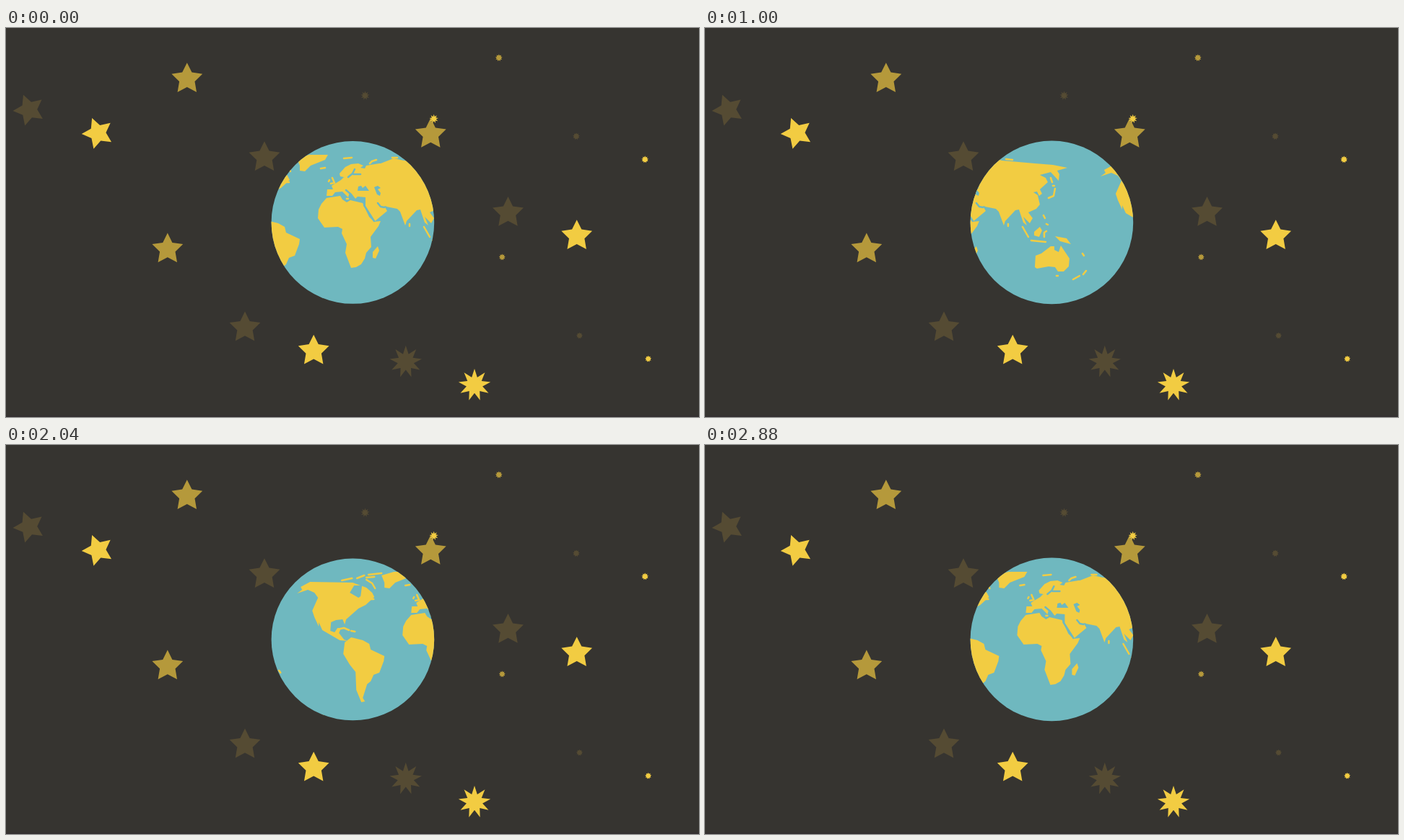
An HTML page with a canvas that plays this animation: 960x540 px, repeating every 2920 ms.

```html
<!DOCTYPE html>
<html lang="en">
<head>
<meta charset="utf-8">
<title>Spinning globe</title>
<style>
html, body { margin: 0; width: 100%; height: 100%; overflow: hidden; background: #363430; }
canvas { display: block; }
</style>
</head>
<body>
<canvas id="stage" width="960" height="540"></canvas>
<script>
const ctx = document.getElementById('stage').getContext('2d');
const BG = '#363430', SEA = '#6fb8bf', LAND = '#f2cc42', MID = '#b5993b', DIM = '#554b33';
const LOOP = 2920, STEP = 40, MAP_WIDTH = 401, SPEED = 0.1391;
const TAU = Math.PI * 2;

// The flat map: filled land and seas, stroked islands and straits.
const land = new Path2D(), islands = new Path2D(), seas = new Path2D(), straits = new Path2D();
function add(layer, dx, d) {
  layer.addPath(new Path2D(d), new DOMMatrix().translate(dx, 0));
}

const WEST = -117, MIDDLE = 0, EAST = 106;

// The Americas
add(land, WEST, `M403,206 410,201 408,197 421,190 480,191 499,198 507,205 510,211 498,222 488,227
  471,242 469,249 466,242 457,243 450,246 449,258 455,260 459,254 464,254 461,261 468,270 473,272
  462,271 438,257 433,246 433,252 427,239 424,230 432,212 427,205 418,201z`);
add(land, WEST, `M469,274 478,267 494,271 503,276 505,284 524,293 523,300 517,316 509,319 505,328
  500,332 494,351 497,356 492,357 485,340 484,315 476,305 467,290z`);
add(seas, WEST, 'M476,205 482,195 493,195 491,210 488,212z');
add(islands, WEST, `M463,255 468,254 475,257 M478,258 483,259 M465,188 479,185 M486,185 496,181
  M502,180 520,178 M499,184 510,183 M499,187 507,192 511,199 M505,214 509,214`);

// Greenland, Africa, Madagascar
add(land, MIDDLE, 'M403,181 420,176 446,176 442,183 422,191 414,199 407,198 407,191z');
add(land, MIDDLE, `M444,236 463,233 466,238 472,242 477,239 494,243 503,262 510,269 519,268
  516,275 505,290 506,304 499,312 497,320 492,328 485,332 478,333 470,312 472,300 465,285 466,279
  460,276 441,277 432,264 433,252 437,244z`);
add(land, MIDDLE, 'M508,311 515,303 517,309 512,320 508,319z');

// Europe and Arabia
add(land, MIDDLE, `M444,233 445,224 453,224 451,219 464,211 468,207 473,208 463,206 462,202
  470,193 478,189 488,188 495,191 491,194 497,195 499,191 517,188 535,187 535,249 524,247
  528,254 510,269 498,250 498,235 487,234 484,237 476,228 474,235 466,227 456,228 452,233z`);
add(straits, MIDDLE, `M474,207 480,202 483,196 M481,203 491,203 M471,225 478,231 483,238
  M496,246 503,257 510,268 M515,243 519,248 524,249`);
add(seas, MIDDLE, `M487,226 488,220 492,219 494,222 498,219 503,226 496,226z
  M510,221 515,219 519,222 515,224 519,229 518,233 514,231z`);
add(islands, MIDDLE, `M450,216 455,215 452,208 M447,213 448,211 M436,195 442,194 M472,237 474,237
  M468,181 479,180 M504,188 507,185 513,183 M535,180 542,180 M556,182 565,183`);

// Asia
add(land, EAST, `M413,188 431,181 445,184 490,188 515,190 535,194 521,198 524,203 523,212
  512,200 497,204 505,208 508,214 497,224 500,230 496,233 493,227 488,228 494,232 497,245 492,251
  481,256 487,264 483,271 474,262 479,274 474,270 468,252 463,253 449,268 447,274 440,255 436,251
  421,248 418,230z`);
add(islands, EAST, `M509,236 516,233 518,223 M515,219 517,219 M512,208 514,214 M502,260 504,264
  M506,272 508,273 M453,272 453,275 M473,276 481,290 M485,295 505,297 M503,290 503,284 506,282`);

// Borneo, New Guinea, Australia, New Zealand
add(land, EAST, `M489,283 497,276 500,281 496,290 489,288z
  M518,289 534,292 540,300 525,296z
  M491,316 499,313 512,303 517,303 517,308 523,311 526,302 538,320 537,331 530,338 522,338
  518,332 509,331 493,334 490,332z`);
add(islands, EAST, 'M543,349 552,344 M557,342 561,337 M520,344 522,344 M556,313 558,316');

// Every star group repeats one anchor: dim, then bright, then half lit.
const copies = [[0, 0, DIM], [95.2, 32.2, LAND], [-107.2, -109, MID]];
const groups = [
  { at: [358, 179.7] }, { at: [695.5, 256.5] }, { at: [331, 416] },
  { at: [32, 113.7], turn: -93 },
  { at: [553.8, 463.3], points: 9 },
  { at: [497.5, 93.8], points: 9, size: 6.3 },
  { at: [790, 150.3], points: 9, size: 4.9, inner: 0.65 },
  { at: [794.5, 427], points: 9, size: 4.5, inner: 0.65 }
];

function star(x, y, { points = 5, size = 22.5, inner = 0.5, turn = 0 }) {
  ctx.beginPath();
  for (let i = 0; i < points * 2; i++) {
    const a = (turn / 360 + i / points / 2) * TAU, r = i % 2 ? size * inner : size;
    ctx.lineTo(x + r * Math.sin(a), y - r * Math.cos(a));
  }
  ctx.fill();
}

function sky() {
  ctx.fillStyle = BG;
  ctx.fillRect(0, 0, 960, 540);
  ctx.fillStyle = '#332f30';
  ctx.fillRect(0, 538, 960, 2);
  for (const group of groups) {
    for (const [dx, dy, colour] of copies) {
      ctx.fillStyle = colour;
      star(group.at[0] + dx, group.at[1] + dy, group);
    }
  }
}

function layer(colour, shapes, lines) {
  ctx.fillStyle = ctx.strokeStyle = colour;
  ctx.fill(shapes);
  ctx.stroke(lines);
}

function globe(t) {
  const height = 113 - 0.9 * Math.cos((t - 440) / 1860 * TAU);
  ctx.save();
  ctx.beginPath();
  ctx.ellipse(480.4, 269.9, 112.8, height, 0, 0, TAU);
  ctx.fillStyle = SEA;
  ctx.fill();
  ctx.clip();
  ctx.lineWidth = 2.5;
  ctx.lineCap = ctx.lineJoin = 'round';
  ctx.translate(-t * SPEED - MAP_WIDTH, 0);
  for (let i = 0; i < 4; i++) {
    layer(LAND, land, islands);
    layer(SEA, seas, straits);
    ctx.translate(MAP_WIDTH, 0);
  }
  ctx.restore();
}

const start = performance.now();
function frame() {
  const now = performance.now() - start;
  sky();
  globe(Math.floor(now % LOOP / STEP) * STEP);
  requestAnimationFrame(frame);
}
frame();
</script>
</body>
</html>
```
